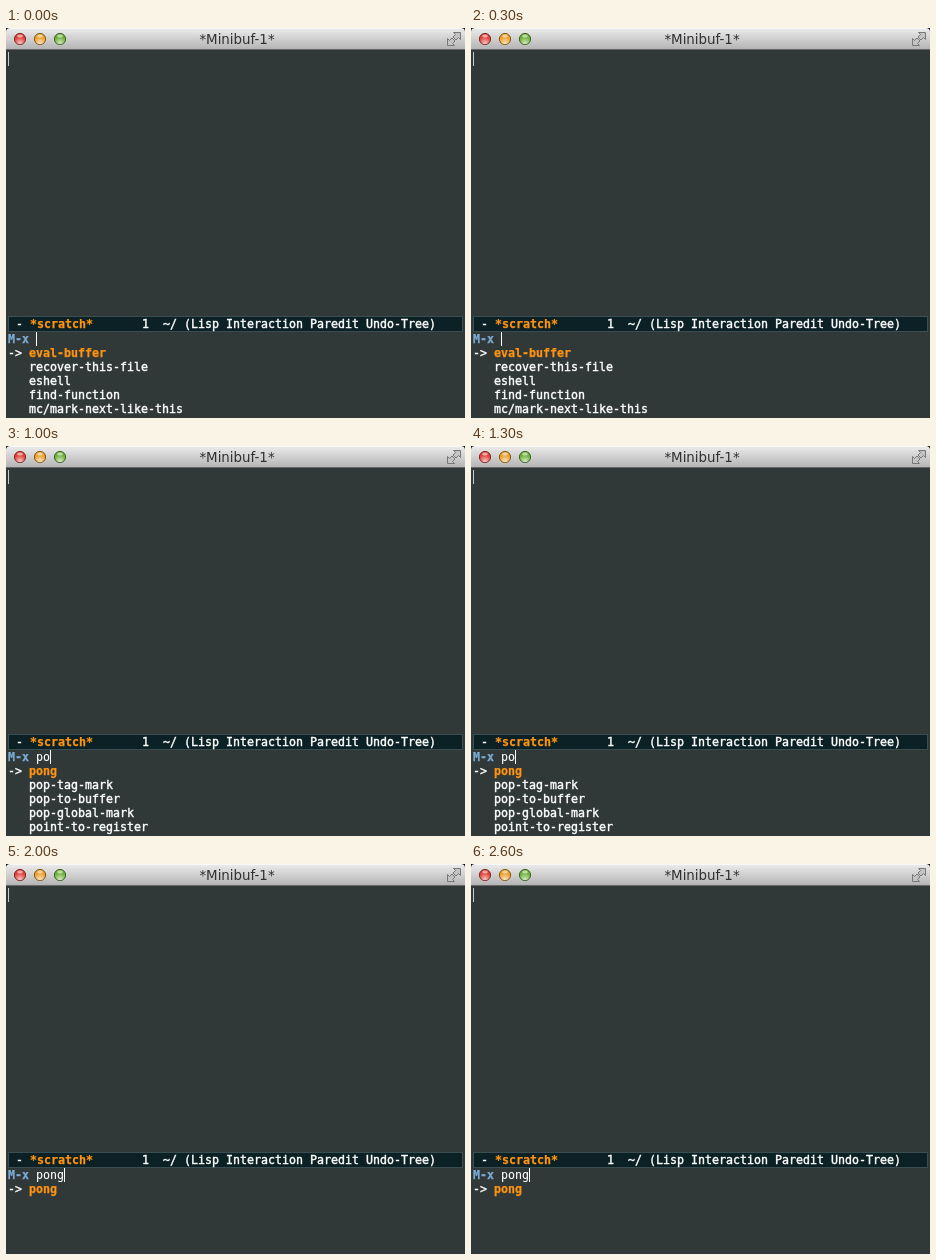
Write an HTML page that moves like this. It is 459 px wide and 390 px high and loops after 3000 ms.

```html
<!DOCTYPE html>
<html lang="en">
<head>
<meta charset="utf-8">
<title>Command completion</title>
<style>
html, body { margin: 0; width: 100%; height: 100%; overflow: hidden; background: #000; }
#stage { position: relative; width: 459px; height: 390px; overflow: hidden; background: #313838; }
#bar { position: absolute; left: 0; top: 0; display: block; }
.row {
  position: absolute; left: 2px; height: 14px; white-space: pre; color: #fff;
  font: 11.63px/14px "DejaVu Sans Mono", monospace;
  -webkit-text-stroke: .4px currentColor;
}
b { font-weight: 700; -webkit-text-stroke-width: .25px; }
#typed { -webkit-text-stroke-width: .1px; }
.hot { color: #ff9410; }
.ask { color: #7dabd6; }
.caret { position: absolute; width: 1px; height: 14px; }
#mode {
  position: absolute; left: 2px; top: 288px; width: 455px; height: 16px;
  box-sizing: border-box; border: 1px solid #3a4d50; background: #0c2125;
}
#mode .row { left: 0; top: 0; }
</style>
</head>
<body>
<div id="stage">
  <svg id="bar" width="459" height="23" viewBox="0 0 459 23">
    <defs>
      <linearGradient id="steel" x2="0" y2="1">
        <stop stop-color="#ececec"/><stop offset="1" stop-color="#b2b2b2"/>
      </linearGradient>
      <radialGradient id="glow" cy=".9" r=".6">
        <stop stop-color="#fff" stop-opacity=".7"/>
        <stop offset="1" stop-color="#fff" stop-opacity="0"/>
      </radialGradient>
    </defs>
    <rect width="459" height="8" fill="#000"/>
    <path d="M0 22V4Q0 0 4 0H455Q459 0 459 4V22Z" fill="url(#steel)"/>
    <path d="M4 .5H455" stroke="#f8f8f8"/>
    <path d="M0 21.5H459" stroke="#686868"/>
    <g id="lights"></g>
    <text x="231" y="16" text-anchor="middle" font-family="DejaVu Sans, sans-serif" font-size="13.4" fill="#303030">*Minibuf-1*</text>
    <g fill="#c4c4c4" stroke="#777">
      <path id="arrow" d="M447.5 4.5H454.5V11.5L452.5 9.5L450 12L447 9L449.5 6.5Z"/>
      <use href="#arrow" transform="rotate(180 448 11)"/>
    </g>
  </svg>
  <i class="caret" style="left:2px;top:24px;background:#c5caca"></i>
  <div id="mode"><div class="row"> - <b class="hot">*scratch*</b>       1  ~/ (Lisp Interaction Paredit Undo-Tree)</div></div>
  <div class="row" style="top:304px"><b class="ask">M-x</b> <span id="typed"></span></div>
  <i class="caret" id="caret" style="top:304px;background:#fff"></i>
  <div class="row" style="top:318px">-> <b class="hot" id="best"></b></div>
  <div class="row" style="top:332px" id="rest"></div>
</div>
<script>
const CELL = 7, LEFT = 2, LOOP = 3000;
const $ = id => document.getElementById(id);

const steps = [
  { at: 0, typed: "", hits: "eval-buffer recover-this-file eshell find-function mc/mark-next-like-this" },
  { at: 500, typed: "p", hits: "package-install previous-buffer package-list-packages pb/close-buffers-in-project projectile-global-mode" },
  { at: 1000, typed: "po", hits: "pong pop-tag-mark pop-to-buffer pop-global-mark point-to-register" },
  { at: 1500, typed: "pon", hits: "pong ns-respond-to-change-font" },
  { at: 2000, typed: "pong", hits: "pong" }
];

$("lights").innerHTML = [[14, "#e0423b", "#7d2722"], [34, "#eda02c", "#80571a"], [54, "#6fb13c", "#3c6123"]]
  .map(([x, fill, edge]) =>
    `<circle cx="${x}" cy="11" r="5.6" fill="${fill}" stroke="${edge}"/>
     <circle cx="${x}" cy="11" r="5.2" fill="url(#glow)"/>
     <ellipse cx="${x}" cy="8" rx="2.8" ry="1.6" fill="#fff" opacity=".55"/>`).join("");

// Snap every glyph to the 7px terminal cell.
const probe = document.createElement("canvas").getContext("2d");
probe.font = '11.63px "DejaVu Sans Mono", monospace';
const gap = CELL - probe.measureText("M".repeat(40)).width / 40;
document.querySelectorAll(".row").forEach(row => row.style.letterSpacing = gap + "px");

let shown;
function draw(now) {
  const time = now % LOOP;
  const step = steps.findLast(s => s.at <= time);
  if (step !== shown) {
    shown = step;
    const [best, ...rest] = step.hits.split(" ");
    $("typed").textContent = step.typed;
    $("caret").style.left = LEFT + CELL * (4 + step.typed.length) + "px";
    $("best").textContent = best;
    $("rest").textContent = rest.map(name => "   " + name).join("\n");
  }
}

const start = performance.now();
function tick() {
  draw(Math.max(0, performance.now() - start));
  requestAnimationFrame(tick);
}
tick();
</script>
</body>
</html>
```
